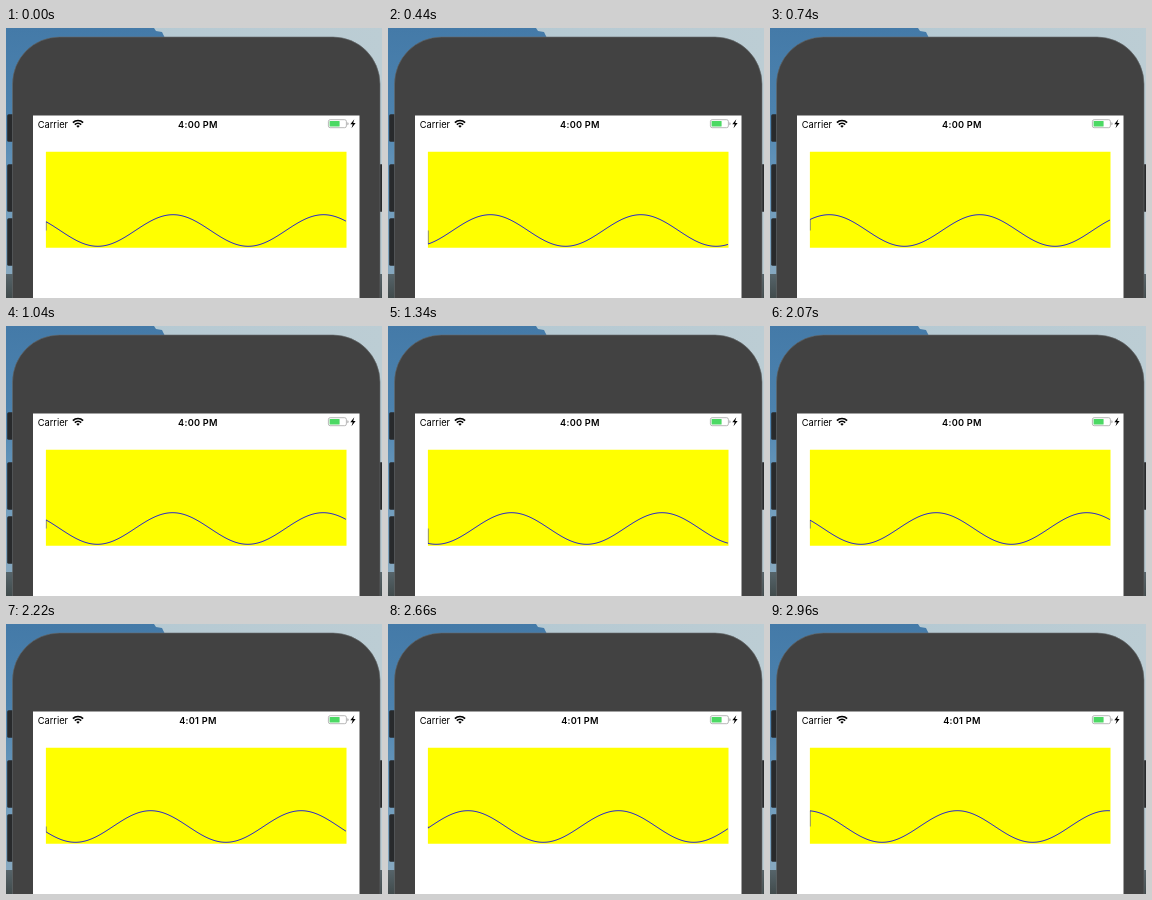
These frames come from a looping animation (376 px wide and 270 px high, 3060 ms). An HTML page:

```html
<!DOCTYPE html>
<html lang="en">
<head>
<meta charset="utf-8">
<title>Sine wave on a phone</title>
<style>
  html, body { margin: 0; width: 100%; height: 100%; overflow: hidden; }
  svg { display: block; width: 376px; height: 270px; }
  text { font-family: Inter, "Liberation Sans", sans-serif; fill: #000; }
</style>
</head>
<body>
<svg viewBox="0 0 376 270">
  <defs>
    <linearGradient id="mountain" x2="0" y2="1">
      <stop offset="0" stop-color="#447aa8"/>
      <stop offset=".3" stop-color="#4c82ae"/>
      <stop offset=".6" stop-color="#6b9abd"/>
      <stop offset="1" stop-color="#8eacc0"/>
    </linearGradient>
    <linearGradient id="sky">
      <stop offset="0" stop-color="#b1c7d2"/>
      <stop offset="1" stop-color="#bccdd4"/>
    </linearGradient>
    <linearGradient id="ground" x2="0" y2="1">
      <stop offset="0" stop-color="#56646a"/>
      <stop offset="1" stop-color="#414b4c"/>
    </linearGradient>
    <clipPath id="chart"><rect x="39.9" y="123.8" width="300.6" height="95.9"/></clipPath>
  </defs>

  <!-- Desktop behind the phone -->
  <rect width="376" height="270" fill="url(#sky)"/>
  <path d="M0 0H148L150 3 156 4 159 10V270H0Z" fill="url(#mountain)"/>
  <rect y="246" width="376" height="24" fill="url(#ground)"/>

  <!-- Phone -->
  <g fill="#282a2c">
    <rect x="1.2" y="86.3" width="8" height="27.5" rx="1.5"/>
    <rect x="1.2" y="136.2" width="8" height="47.6" rx="1.5"/>
    <rect x="1.2" y="190.2" width="8" height="47.6" rx="1.5"/>
    <rect x="370" y="136.2" width="8" height="47.6" rx="1.5"/>
  </g>
  <rect x="6.5" y="9" width="367.5" height="330" rx="47" fill="#424242" stroke="#666a6c" stroke-width=".6"/>
  <rect x="27" y="87.5" width="326.5" height="183" fill="#fff"/>

  <!-- Status bar -->
  <text x="31.7" y="99.5" font-size="9.3">Carrier</text>
  <text id="clock" x="191.9" y="99.5" font-size="9.2" font-weight="600" letter-spacing=".25" text-anchor="middle">4:00 PM</text>
  <g fill="none" stroke="#000" stroke-width="1.6">
    <path d="M66.9 94.6a7.2 7.2 0 0 1 10.2 0"/>
    <path d="M68.8 96.6a4.5 4.5 0 0 1 6.4 0"/>
  </g>
  <path d="M72 99.8l-1.7-1.8a2.4 2.4 0 0 1 3.4 0z"/>
  <rect x="322.4" y="91.7" width="18" height="8" rx="1.8" fill="#fff" stroke="#a5a5a5" stroke-width=".8"/>
  <rect x="323.6" y="92.9" width="10" height="5.6" rx=".6" fill="#4cd964"/>
  <path d="M341.4 94.2v3q1.2-.4 1.2-1.5t-1.2-1.5z" fill="#a5a5a5"/>
  <path d="M348.3 91.2l-4 5h2.4l-1.2 4 4.1-5.2h-2.4z"/>

  <!-- Chart -->
  <g clip-path="url(#chart)">
    <rect width="376" height="270" fill="#ff0"/>
    <path id="wave" fill="none" stroke="#0000f0" stroke-width=".9"/>
  </g>
</svg>
<script>
  const LOOP = 3060;
  const STEPS = [150, 290, 440, 590, 740, 890, 1040, 1190, 1340, 1480,
    1630, 1780, 1930, 2070, 2220, 2370, 2510, 2660, 2810, 2960];
  const CLOCK_CHANGE = 2220;
  const LEFT = 39.9, WIDTH = 300, MIDDLE = 202.5, AMPLITUDE = 15.8;
  const WAVELENGTH = 150.5, FIRST_PEAK = 167, PHASE_STEP = 0.9;

  const wave = document.getElementById("wave");
  const clock = document.getElementById("clock");

  function wavePath(phase) {
    let path = `M${LEFT} ${MIDDLE}`;
    for (let dx = 0; dx <= WIDTH; dx++) {
      const x = LEFT + dx;
      const angle = 2 * Math.PI * (x - FIRST_PEAK) / WAVELENGTH + phase;
      path += `L${x.toFixed(2)} ${(MIDDLE - AMPLITUDE * Math.cos(angle)).toFixed(2)}`;
    }
    return path;
  }

  function draw() {
    const time = performance.now() % LOOP;
    const step = STEPS.filter(start => start <= time).length;
    wave.setAttribute("d", wavePath(step * PHASE_STEP));
    clock.textContent = time < CLOCK_CHANGE ? "4:00 PM" : "4:01 PM";
    requestAnimationFrame(draw);
  }
  draw();
</script>
</body>
</html>
```
